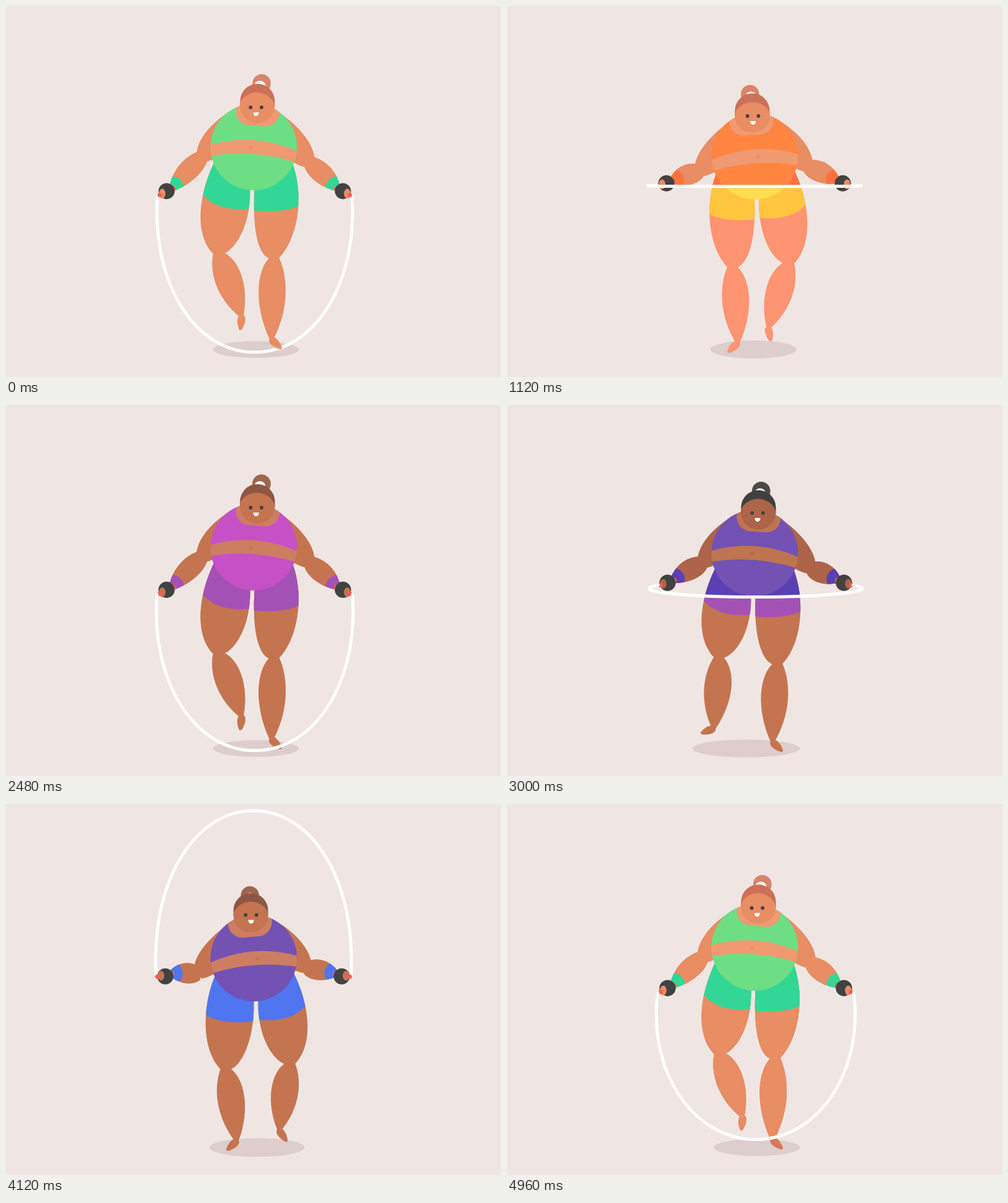
Write an HTML page with a canvas that moves like this. It is 800 px wide and 600 px high and loops after 5 s.

```html
<!DOCTYPE html>
<html lang="en">
<head>
<meta charset="utf-8">
<title>Rope skipping</title>
<style>
  html, body { margin: 0; width: 100%; height: 100%; overflow: hidden; background: #efe6e3; }
  canvas { display: block; width: 800px; height: 600px; }
</style>
</head>
<body>
<canvas id="stage" width="800" height="600"></canvas>
<script>
const ctx = document.getElementById('stage').getContext('2d');
const LOOP = 5000, TURN = 625, HALF = 2 * TURN, STEP = 40, CX = 401;
const W = 2 * Math.PI / TURN;
const BACK = '#efe6e3', DARK = '#424242', NAIL = '#ff5c56', WHITE = '#ffffff';

// Top and shorts, one pair per turn of the rope
const outfits = [
  ['#6ede84', '#32d796'], ['#ffdc50', '#ffc53f'], ['#ff8540', '#ff7240'], ['#f5557d', '#dc4680'],
  ['#c650c6', '#a451b5'], ['#7352b4', '#5a40b4'], ['#7352b4', '#5075f0'], ['#46c8e6', '#32aadc']
];

// Skin, light skin, hair, bun and sole, from light to dark
const tones = [
  ['#ff9472', '#ffa97e', '#ffc53f', '#ffdc50', '#ff6455'],
  ['#e88d64', '#f09a72', '#cc7058', '#d8856a', '#d67a55'],
  ['#d67a55', '#df8a68', '#ad6350', '#ba735c', '#c06a4c'],
  ['#c57450', '#cd7d62', '#8f5743', '#9d664f', '#ad6449'],
  ['#ad6449', '#bf7450', '#404040', '#4a4a4a', '#96523c']
];

// Skin tones run from light to dark and back over eight turns
function look(turn) {
  const n = (turn + 8) % 8;
  const [top, shorts] = outfits[n];
  const [skin, light, hair, bun, sole] = tones[Math.abs((n + 3) % 8 - 4)];
  return { top, shorts, skin, light, hair, bun, sole };
}

const clamp01 = u => Math.min(1, Math.max(0, u));
const ramp = (t, a, b) => clamp01((t - a) / (b - a));
const ease = (t, a, b) => { const u = ramp(t, a, b); return u * u * (3 - 2 * u); };
const mix = (a, b, u) => a + (b - a) * u;

// Leg time, centred so that the raised phase is in one piece
const legTime = t => (t + TURN) % (2 * HALF) - TURN;

function lift(t) {
  const s = legTime(t);
  return ease(s, -390, -50) - ease(s, 660, 1000);
}

// The raised leg starts bent back and kicks forward; the other one hops
function legPose(t, y) {
  const s = legTime(t), up = lift(t);
  const kick = ease(s, 220, 575), toe = ramp(s, 100, 640) ** 2;
  const bend = ((1 - Math.cos(W * (t - 62))) / 2) ** 3;
  return {
    knee: {
      x: mix(368 - 14 * bend, 342, up),
      y: y + mix(181, 174 - 4 * kick, up)
    },
    ankle: {
      x: mix(373, 381 - 53 * kick, up),
      y: mix(Math.min(545, y + 311), y + 274 + 18 * toe, up)
    },
    angle: mix(136, 95 + 116 * toe, up)
  };
}

// Rope angle: 0 is under the feet, PI overhead; it falls faster than it rises
function ropeAngle(t) {
  const a = W * (t + 6) - .33;
  return a + .35 * Math.cos(a);
}

function pose(t) {
  const y = 235 - 13 * Math.cos(W * (t - 62)) + 1.8 * (1 + Math.cos(W * t / 2));
  const lean = lift(t) - lift(t + HALF);
  const phi = ropeAngle(t);
  return {
    y, lean, phi,
    nod: 2.5 + 2.8 * Math.cos(W * (t - 20)),
    head: { x: CX + 5.4 * lean, y: y - 69.6 + 3.4 * Math.cos(W * (t - 545)) },
    left: legPose(t, y), right: legPose(t + HALF, y),
    handY: 289 + 10.5 * Math.cos(phi - .2)
  };
}

function fill(path, color) {
  ctx.fillStyle = color;
  ctx.fill(path);
}

function oval(x, y, rx, ry, color, to = 2 * Math.PI) {
  const p = new Path2D();
  p.ellipse(x, y, rx, ry, 0, 0, to);
  fill(p, color);
}

function group(draw) {
  ctx.save();
  draw();
  ctx.restore();
}

// Draws a left half, then the right half as its mirror image
function bothSides(draw) {
  draw(1);
  group(() => {
    ctx.translate(2 * CX, 0);
    ctx.scale(-1, 1);
    draw(-1);
  });
}

// Runs draw in a frame whose x axis goes from a to b
function along(a, b, draw) {
  group(() => {
    ctx.translate(a.x, a.y);
    ctx.rotate(Math.atan2(b.y - a.y, b.x - a.x));
    draw(Math.hypot(b.x - a.x, b.y - a.y));
  });
}

// Tapered limb along the x axis, with a bulge on each side
function limb(len, root, tip, above, below) {
  const p = new Path2D();
  p.moveTo(-3, root);
  p.bezierCurveTo(.25 * len, below, .65 * len, below, len, tip);
  p.lineTo(len, -tip);
  p.bezierCurveTo(.6 * len, -above, .15 * len, -above, -3, -root);
  p.closePath();
  return p;
}

function drawFoot({ ankle, angle }, c) {
  group(() => {
    ctx.translate(ankle.x, ankle.y);
    ctx.rotate(angle * Math.PI / 180);
    const foot = new Path2D('M-3 0C-3 -9 12 -7 21 -2C23 0 23 2 20 3C10 8 -3 8 -3 0Z');
    fill(foot, c.skin);
    ctx.clip(foot);
    oval(11, -13 + 12 * ramp(angle, 148, 198), 12, 6, c.sole);
  });
}

function drawLeg(p, leg, lean, c) {
  const { knee: k, ankle } = leg, y = p.y;
  const hip = CX - 1.3 * lean, inner = CX - 4 - 3 * lean;
  const thigh = new Path2D();
  thigh.moveTo(hip - 56, y + 12);
  thigh.bezierCurveTo(hip - 83, y + 57, k.x - 44, k.y - 38, k.x - 6, k.y);
  thigh.lineTo(k.x + 6, k.y);
  thigh.bezierCurveTo(k.x + 30, k.y - 6, inner + 4, y + 122, inner, y + 62);
  thigh.lineTo(inner, y + 20);
  thigh.closePath();

  drawFoot(leg, c);
  along(k, ankle, len => fill(limb(len, 7, 3, 30, 25), c.skin));
  fill(thigh, c.skin);
  group(() => {
    ctx.clip(thigh);
    const hem = new Path2D(), out = y + 83 - 5.5 * lean, end = y + 101 - 1.5 * lean;
    hem.moveTo(CX - 95, y);
    hem.lineTo(CX - 95, out - 10);
    hem.lineTo(CX - 83, out);
    hem.quadraticCurveTo(CX - 58, end + 6, inner + 2, end);
    hem.lineTo(inner + 2, y);
    fill(hem, c.shorts);
  });
}

function drawArm(p, lean, c) {
  const y = p.y, hand = { x: CX + lean - 142.5, y: p.handY };
  const e = { x: CX - 87.5 + 2.5 * lean, y: y + 20.5 - 4.5 * lean };
  const upper = new Path2D();
  upper.moveTo(CX - 33 + 4 * lean, y - 60 - 2.3 * lean);
  upper.bezierCurveTo(CX - 58 + 3.6 * lean, y - 47 - 4.6 * lean, e.x - 6, e.y - 36, e.x - 8, e.y - 5);
  upper.lineTo(e.x + 5, e.y + 8);
  upper.quadraticCurveTo(e.x + 14, e.y + 7, e.x + 24, e.y + 1);
  upper.lineTo(CX, y);
  fill(upper, c.skin);

  along(e, { x: hand.x + 9, y: hand.y - 5 }, len => {
    const fore = limb(len, 10, 6, 19, 20);
    fill(fore, c.skin);
    ctx.clip(fore);
    oval(len, 0, 19, 19, c.shorts);
  });

  const swing = Math.cos(p.phi);
  oval(hand.x + 11, hand.y - 4, 3.5, 4, NAIL);
  oval(hand.x, hand.y, 13, 13, DARK);
  oval(hand.x - 7, hand.y + 1.5 + 2.5 * swing, 5.3, 7.8, c.skin);
  oval(hand.x - 12 + swing, hand.y + 3.5 + 3 * swing, 3.6, 3.4, NAIL);
}

function drawTorso(p, c) {
  const disc = new Path2D();
  disc.arc(CX - .6, p.y, 70, 0, 2 * Math.PI);
  fill(disc, c.top);
  group(() => {
    ctx.clip(disc);
    ctx.translate(CX, p.y);
    ctx.rotate(.075 * p.lean);
    fill(new Path2D('M-74 3Q0 -25 74 3V20.5Q0 2 -74 20.5Z'), c.light);
    oval(-5 * p.lean, 1.5, 2.7, 2.7, c.skin);
    const neck = new Path2D();
    neck.roundRect(2 * p.lean - 36, -100, 71, 65.5, 23);
    fill(neck, c.light);
  });
}

function drawHead(p, c) {
  const { x, y } = p.head, nod = p.nod;
  const turn = p.lean * (1.5 + nod);
  const bx = x + turn, by = y - 31.5 - .85 * nod;
  const bun = new Path2D();
  bun.roundRect(bx - 14.7, by - 14.7, 29.4, 30, 14.7);
  fill(bun, c.bun);
  oval(x + .6 * turn, by + 4, 9, 8, WHITE);

  const head = new Path2D();
  head.roundRect(x - 28, y - 35, 56, 63, 28);
  fill(head, c.hair);
  group(() => {
    ctx.clip(head);
    oval(x - .15 * turn, y + 7, 30, 28, c.skin);
  });
  const fx = x - .33 * turn, fy = y + .5 + .5 * nod;
  oval(fx - 8.8, fy, 2.9, 2.9, DARK);
  oval(fx + 8.8, fy, 2.9, 2.9, DARK);
  oval(fx, fy + 8, 4.6, 6, WHITE, Math.PI);
}

function drawFigure(p, c) {
  bothSides(side => drawLeg(p, side > 0 ? p.left : p.right, side * p.lean, c));
  bothSides(side => drawArm(p, side * p.lean, c));
  drawTorso(p, c);
  drawHead(p, c);
}

// Rope from the left hand to the right one, as a seen-from-the-front half ring
function ropeCurve(p) {
  const cos = Math.cos(p.phi), sin = Math.sin(p.phi);
  const mid = CX + p.lean;
  const reach = 157.5 - 4 * sin - 4 * sin * sin;
  const wide = reach + 9 + 48 * sin * sin;
  const y = p.handY + 3.5 + 4.5 * cos;
  const apex = 286 + 275 * cos - 8 * sin;
  const bend = mix(y, apex, .56);
  return `${mid - reach} ${y}C${mid - wide} ${bend} ${mid - 97} ${apex} ${mid} ${apex}` +
    `C${mid + 97} ${apex} ${mid + wide} ${bend} ${mid + reach} ${y}`;
}

function drawRope(p) {
  ctx.strokeStyle = WHITE;
  ctx.lineWidth = 5;
  ctx.lineCap = 'round';
  ctx.stroke(new Path2D('M' + ropeCurve(p)));
}

function drawShadow(p) {
  const edge = leg => 49 + .75 * leg.ankle.x;
  const from = edge(p.left), to = 2 * CX - edge(p.right);
  oval((from + to) / 2, 555.5, (to - from) / 2, 13 + (p.y - 222) / 13, '#ddcdcd');
}

function render(t) {
  const p = pose(t);
  const turn = Math.floor(p.phi / (2 * Math.PI));
  const falling = Math.sin(p.phi) < 0;

  ctx.fillStyle = BACK;
  ctx.fillRect(0, 0, 800, 600);
  drawShadow(p);
  if (!falling) drawRope(p);
  drawFigure(p, look(turn));
  if (falling) {
    // The falling rope wipes in the next look above it
    group(() => {
      ctx.clip(new Path2D(`M0 0V${p.handY}L${ropeCurve(p)}L800 ${p.handY}V0Z`));
      drawFigure(p, look(turn + 1));
    });
    drawRope(p);
  }
}

const start = performance.now();
function tick(now) {
  const t = Math.max(0, now - start) % LOOP;
  render(Math.floor(t / STEP) * STEP);
  requestAnimationFrame(tick);
}
render(0);
requestAnimationFrame(tick);
</script>
</body>
</html>
```
